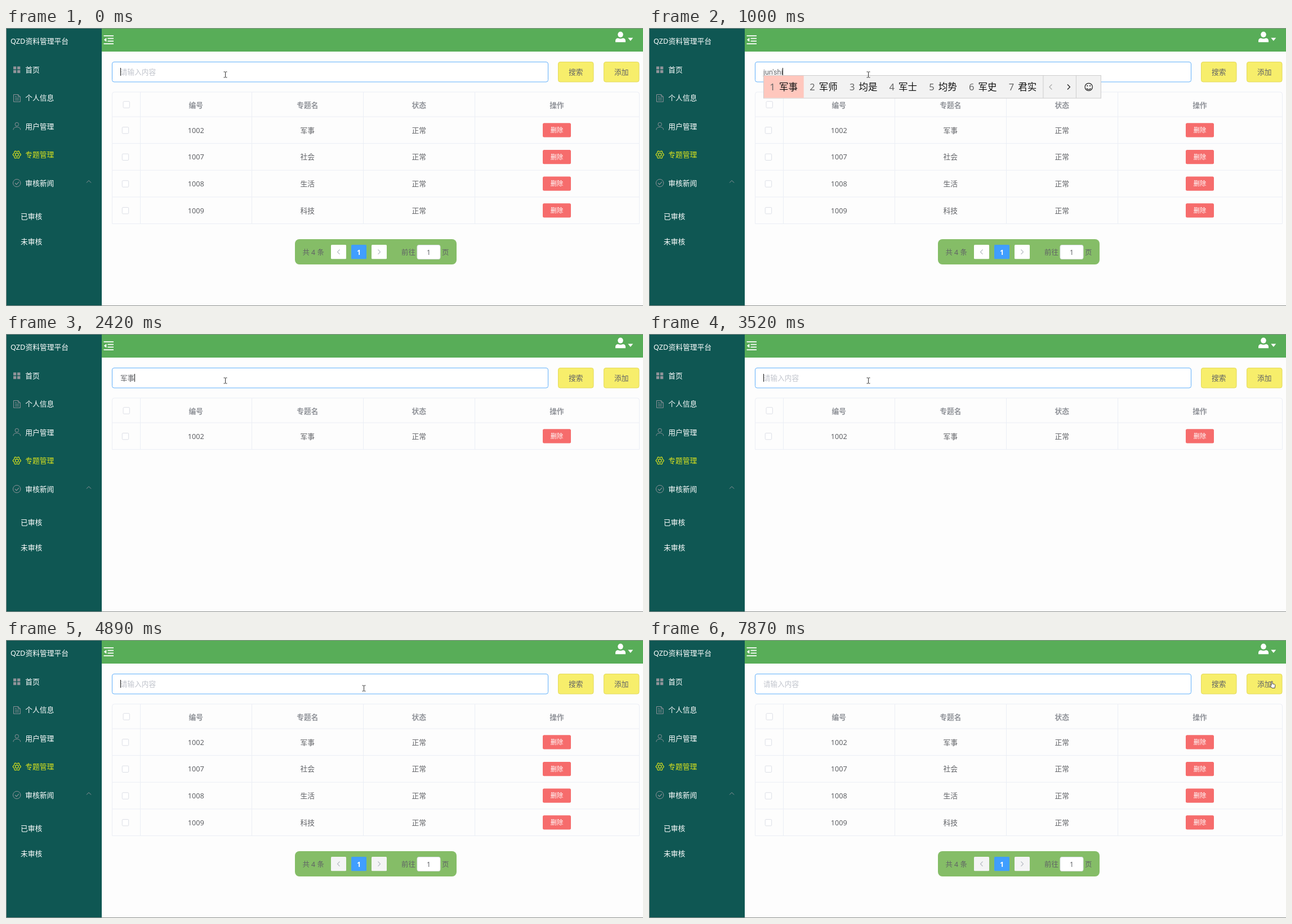
Animation of 1131 by 495 pixels, one loop 8000 ms. Source, as an HTML page:

```html
<!DOCTYPE html>
<html lang="zh-CN">
<head>
<meta charset="utf-8">
<style>
html, body { margin: 0; width: 100%; height: 100%; overflow: hidden; background: #fdfdfd; }
svg { display: block; font-family: "Noto Sans", "Noto Sans CJK SC", "Noto Sans CJK", sans-serif; }
#field { font-family: Roboto, "Noto Sans CJK SC", "Noto Sans CJK", sans-serif; }
</style>
</head>
<body>
<svg id="stage" width="1131" height="495" viewBox="0 0 1131 495"></svg>
<script>
const rect = (x, y, w, h, fill, attrs = '') =>
  `<rect x="${x}" y="${y}" width="${w}" height="${h}" fill="${fill}" ${attrs}/>`;
const line = (d, color, width = 1, fill = 'none') =>
  `<path d="${d}" fill="${fill}" stroke="${color}" stroke-width="${width}"/>`;
// Text is placed by its vertical centre.
const text = (x, y, str, fill, size = 12.75, attrs = '') =>
  `<text x="${x}" y="${y + size * .38}" fill="${fill}" font-size="${size}" ${attrs}>${str}</text>`;
const MID = 'text-anchor="middle"', BOLD = MID + ' font-weight="700"';
const GREY = '#909399', INK = '#606266', RULE = '#ebeef5', ACTIVE = '#dbe31d';

function gear(cx, cy) {
  const pts = Array.from({ length: 48 }, (_, i) => {
    const a = i * Math.PI / 24, r = 6.2 + .8 * Math.cos(6 * a);
    return (cx + r * Math.cos(a)).toFixed(1) + ' ' + (cy + r * Math.sin(a)).toFixed(1);
  });
  return line('M' + pts.join('L') + 'Z', ACTIVE, 1.2) +
    `<circle cx="${cx}" cy="${cy}" r="2.8" fill="none" stroke="${ACTIVE}" stroke-width="1.2"/>`;
}

function sidebar() {
  const items = ['首页', '个人信息', '用户管理', '专题管理', '审核新闻'];
  return rect(0, 0, 170, 495, '#0f5753') +
    text(8, 23.5, 'QZD资料管理平台', '#fff') +
    items.map((s, i) => text(34.3, 74.3 + i * 50.35, s, i == 3 ? ACTIVE : '#fff')).join('') +
    text(26, 335.5, '已审核', '#fff') + text(26, 380.5, '未审核', '#fff') +
    [[13, 68.5], [20, 68.5], [13, 75], [20, 75]].map(([x, y]) => rect(x, y, 5.3, 5.2, GREY)).join('') +
    line('M13.5 118.5h8l3.8 3.8v9h-11.8zM21.5 118.5v3.8h3.8M16 122h3M16 125h7M16 128h7', GREY) +
    `<circle cx="19.3" cy="171.5" r="3.2" fill="none" stroke="${GREY}"/>` +
    line('M13 181.3c0-3.5 2.5-4.8 6.3-4.8s6.3 1.3 6.3 4.8', GREY) +
    gear(19.3, 225.5) +
    `<circle cx="19.2" cy="276" r="6.7" fill="none" stroke="${GREY}"/>` +
    line('M16 276l2.6 2.6 4.4-4.8', GREY, 1.1) + line('M143 275.5l4-4 4 4', GREY);
}

function topbar() {
  return rect(170, 0, 961, 42, '#58ad58') +
    line('M173.5 13.8h17.5M180.5 18.6h10.5M180.5 23.3h10.5M173.5 28.2h17.5', '#fff', 1.8) +
    '<path d="M178.3 17.6v7l-4.6-3.5z" fill="#fff"/>' +
    '<ellipse cx="1091" cy="11.6" rx="4.8" ry="5.1" fill="#fff"/>' +
    '<path d="M1082 25.3v-2.5q0-4.3 4.5-4.8 4.5 1.8 9 0 4.5.5 4.5 4.8v2.5z" fill="#fff"/>' +
    '<path d="M1104.3 17.6h9l-4.5 5.3z" fill="#fff"/>';
}

const yellowButton = (x, s) =>
  rect(x + .5, 60.5, 62.5, 35.5, '#f7ee6b', 'rx="3.5" stroke="#e2d95c"') +
  text(x + 31.7, 78.5, s, INK, 12.75, MID);
const checkbox = (x, y) => rect(x - 5.7, y - 5.7, 11.4, 11.4, '#fff', 'rx="1.5" stroke="#dcdfe6"');

const COLS = [337.3, 535.3, 733.3], EDGES = [238.5, 436.5, 634.5, 832.5];
const vertical = (y, h) => line(EDGES.map(x => `M${x} ${y}v${h}`).join(''), RULE);

function tableHead() {
  return line('M188.5 158v-40q0-4 4-4h928q4 0 4 4v40z', RULE) + vertical(114, 44) +
    checkbox(213.8, 136.5) +
    ['编号', '专题名', '状态'].map((s, i) => text(COLS[i], 136.7, s, GREY, 12.75, BOLD)).join('') +
    text(978, 136.7, '操作', GREY, 12.75, BOLD);
}

function tableRow(id, topic, i) {
  const y = 158 + i * 47.65, c = y + 24;
  return line(`M188.5 ${y}v47.6h936v-47.6`, RULE) + vertical(y, 47.6) + checkbox(212, c + .2) +
    [id, topic, '正常'].map((s, k) => text(COLS[k], c - .2, s, INK, 12.75, MID)).join('') +
    rect(953, c - 12.7, 50, 25.2, '#f66c6c', 'rx="2.5"') + text(978, c - .1, '删除', '#fff', 11.2, MID);
}

function pager() {
  return rect(513, 376, 287, 45, '#85bd67', 'rx="8"') +
    text(526.5, 399, '共 4 条', INK, 12.4) +
    `<g id="steps">${rect(577, 386, 27, 25.3, 'inherit', 'rx="1.5"')}${rect(649, 386, 27, 25.3, 'inherit', 'rx="1.5"')}</g>`
      .replaceAll('fill="inherit"', '') +
    line('M592.5 394.5l-4 4.2 4 4.2M660.5 394.5l4 4.2-4 4.2', '#b4b8c0', 1.1) +
    rect(613, 386, 27, 25.3, '#409eff', 'rx="1.5"') + text(626.5, 398.8, '1', '#fff', 12.4, BOLD) +
    text(702, 399, '前往', INK, 12.4) +
    rect(730, 386.5, 41, 25, '#fff', 'rx="3" stroke="#dcdfe6"') + text(750.5, 399, '1', INK, 12, MID) +
    text(774, 399, '页', INK, 12.4);
}

function candidates(words) {
  const cell = 37.7 + 16.5 * words[0].length, end = 202 + cell * 7 + 3;
  return rect(203.5, 84.5, end + 99.5 - 203.5 + 3, 40.5, '#f2f2f2', 'stroke="#cdcdcd"') +
    rect(204, 85, cell, 39.5, '#ffc7bd') +
    words.map((w, i) => text(214.5 + i * cell, 105, i + 1, '#666', 16.5) +
      text(231 + i * cell, 105, w, '#111', 16.5)).join('') +
    line(`M${end} 85v40m58.5 0v-40`, '#cdcdcd') +
    line(`M${end + 15.5} 100.5l-4.5 4.5 4.5 4.5`, '#aaa', 1.2) +
    line(`M${end + 43} 100.5l4.5 4.5-4.5 4.5`, '#222', 1.3) +
    `<circle cx="${end + 80.8}" cy="105" r="6.7" fill="none" stroke="#222" stroke-width="1.2"/>` +
    line(`M${end + 77} 107.5q3.8 4 7.6 0`, '#222', 1.1) +
    rect(end + 77.5, 102, 1.8, 1.8, '#222') + rect(end + 82.3, 102, 1.8, 1.8, '#222');
}

const POINTERS = {
  beam: line('M-3 -5h2.2l.8 .7 .8-.7h2.2M-3 5h2.2l.8-.7 .8 .7h2.2M0 -4.5v9', '#333'),
  arrow: line('M.5 .5v9l2.1-2 1.4 3.2 1.5-.7-1.4-3h2.9z', '#222', .8, '#fff'),
  hand: line('M-2 1.5v-6.5q0-1.2 1-1.2t1 1.2v3.5l3.6.8q1.2.4 1.2 1.8l-.7 5h-5l-3.2-4.2q-.6-1.6.8-1.2z', '#333', .9, '#fff')
};

stage.innerHTML = sidebar() + topbar() +
  rect(188.5, 60.5, 774, 35.5, '#fff', 'rx="3.5" stroke="#62b1fb"') +
  `<g id="field">${text(203, 78, '', INK, 12.6)}</g>` +
  yellowButton(980, '搜索') + yellowButton(1061, '添加') +
  tableHead() + tableRow('1002', '军事', 0) +
  `<g id="others">${tableRow('1007', '社会', 1) + tableRow('1008', '生活', 2) + tableRow('1009', '科技', 3)}</g>` +
  `<g id="pages">${pager()}</g>` +
  rect(0, 71, 1, 14, '#111', 'id="caret"') + '<g id="ime"></g>' +
  line('M0 .5h1131M.5 0v495M0 494.5h1131', '#8a8f8c') +
  '<g id="pointer"></g>';

const SINGLE = [...'就将及家几见加'], JU = [...'据局具句举剧居'], JUN = [...'军均君俊菌钧峻'];
const DOUBLE = ['军事', '军师', '均是', '军士', '均势', '军史', '君实'];
const HINT = '请输入内容';

// [time, field content, candidate words]
const TYPING = [
  [0, ''], [400, 'j', SINGLE], [520, 'ju', JU], [640, 'jun', JUN],
  [760, "jun's", DOUBLE], [880, "jun'sh", DOUBLE], [1000, "jun'shi", DOUBLE],
  [1370, '军事'], [3250, '军'], [3370, '']
];
const BLINKS = [1900, 2420, 2950, 3250, 4010, 4500, 5010, 5520, 6040, 6580, 7090, 7600, 7870];
// [time, pointer, x, y]
const MOVES = [
  [0, 'beam', 389.5, 83], [4380, 'arrow', 520, 105], [4500, 'arrow', 644, 118],
  [4650, 'arrow', 640, 103], [4770, 'beam', 636, 90], [4890, 'beam', 635.5, 86],
  [5010, 'beam', 610.5, 79.5], [5260, 'beam', 606.5, 75.5], [5400, 'beam', 606, 72],
  [5520, 'beam', 605.5, 70], [5670, 'beam', 605, 68.5], [5920, 'beam', 740, 88],
  [6040, 'arrow', 890, 130], [6160, 'arrow', 985, 163], [6280, 'arrow', 1021, 177],
  [6430, 'arrow', 1019, 170], [6580, 'arrow', 1017, 130], [6700, 'hand', 1014, 100],
  [6850, 'hand', 1013, 94], [6970, 'hand', 1018, 82], [7090, 'arrow', 1035, 55],
  [7210, 'arrow', 1062, 34], [7330, 'arrow', 1085, 24], [7450, 'arrow', 1100, 20],
  [7600, 'arrow', 1123, 46], [7720, 'hand', 1111, 80], [7870, 'hand', 1107, 79.5]
];

const at = (list, t) => list.findLast(k => k[0] <= t);
const show = (el, on) => el.setAttribute('visibility', on ? 'visible' : 'hidden');
const entry = field.firstChild;
let shownTyping, shownMove;

function draw() {
  const t = performance.now() % 8000;
  const typing = at(TYPING, t), move = at(MOVES, t);
  if (typing != shownTyping) {
    const [, value, words] = shownTyping = typing;
    entry.textContent = value || HINT;
    entry.setAttribute('fill', value ? INK : '#c0c4cc');
    caret.setAttribute('x', Math.round(203 + (value ? entry.getComputedTextLength() : 0)));
    ime.innerHTML = words ? candidates(words) : '';
  }
  if (move != shownMove) {
    const [, kind, x, y] = shownMove = move;
    pointer.innerHTML = POINTERS[kind];
    pointer.setAttribute('transform', `translate(${x} ${y})`);
  }
  show(caret, BLINKS.filter(b => b <= t).length % 2 == 0);
  show(others, t < 2020 || t >= 3640);
  show(pages, t < 1650 || t >= 3640);
  steps.setAttribute('fill', t < 1650 ? '#fff' : '#f4f4f5');
  requestAnimationFrame(draw);
}
draw();
</script>
</body>
</html>
```
